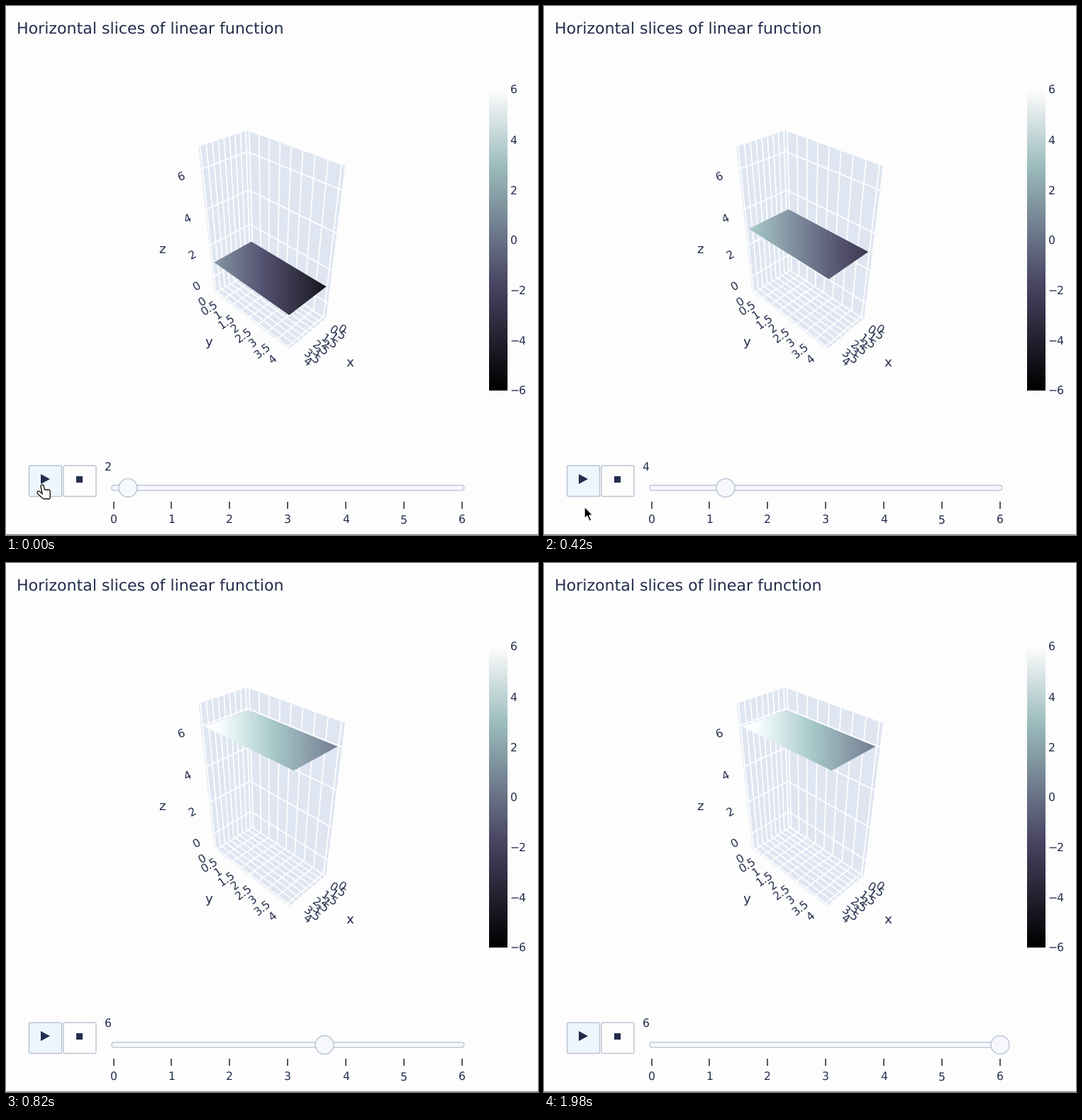
A matplotlib script for the animation above (2 s loop, 750x747 px).

```python
import numpy as np
import matplotlib.pyplot as plt
from matplotlib.animation import FuncAnimation
from matplotlib.collections import LineCollection
from matplotlib.colors import LinearSegmentedColormap
from matplotlib.patches import Circle, FancyBboxPatch, Polygon
from matplotlib.path import Path

W, H, DPI = 750, 747, 100
LOOP, TICK = 2000, 20
PX = 72 / DPI
PAGE, INK, WALL = "#fdfdfd", "#232d4c", "#dfe6f1"
BORDER, KNOB = "#b4bfce", "#f6f8fd"
BONE = LinearSegmentedColormap.from_list("bone_like", [
    (0, "#000000"), (0.365, "#4b4866"), (0.746, "#9cbcbd"), (1, "#fdfdfd")])

# The slice covers 0..4 in x and y, the box is slightly wider
SIDE, PAD = 4, 0.12
NEAR, FAR, LOW, TOP = SIDE + PAD, -PAD, -1, 7

plt.rcParams["font.family"] = "DejaVu Sans"
plt.rcParams["text.hinting"] = "none"
fig = plt.figure(figsize=(W / DPI, H / DPI), dpi=DPI, facecolor=PAGE)
ax = fig.add_axes([0, 0, 1, 1])
ax.axis("off")


# ---------- camera: looks along (-1, -1, -1) at a box of ratio 1:2:3 ----------
EYE, FOCAL, CENTRE = 1.25 * 3 ** 0.5, 546, (369.4, 330.2)


def project(*points):
    x, y, z = np.array(points, float).T
    span = NEAR - FAR
    x, y = (x - 2) / span / 3, (y - 2) / span * 2 / 3
    z = (z - 3) / (TOP - LOW)
    zoom = FOCAL / (EYE - (x + y + z) / 3 ** 0.5)
    return np.column_stack([CENTRE[0] + zoom * (y - x) / 2 ** 0.5,
                            CENTRE[1] + zoom * (x + y - 2 * z) / 6 ** 0.5])


def level(lo, hi, z):
    return [(hi, lo, z), (lo, lo, z), (lo, hi, z), (hi, hi, z)]


# ---------- drawing helpers ----------
def label(x, y, s, size=15.6, angle=0, ha="center", drop=0.365):
    """Text whose digits are centred on (x, y), turned counter-clockwise."""
    a = np.radians(angle)
    return ax.text(x + drop * size * np.sin(a), y + drop * size * np.cos(a), s,
                   fontsize=size * PX, color=INK, rotation=angle, ha=ha,
                   va="baseline", rotation_mode="anchor", zorder=6)


def tick(point, along, s):
    """Axis label at a 3D point, written along a 3D direction."""
    p, q = project(point, np.add(point, along))
    label(*p, s, angle=np.degrees(np.arctan2(p[1] - q[1], q[0] - p[0])))


def box(x0, y0, x1, y1, r, face, edge):
    ax.add_patch(FancyBboxPatch((x0, y0), x1 - x0, y1 - y0, fc=face, ec=edge,
                                boxstyle=f"round,pad=0,rounding_size={r}",
                                lw=1.3 * PX, zorder=4))


def shape(points, face, edge="none", lw=0, z=5):
    return ax.add_patch(Polygon(points, closed=True, fc=face, ec=edge, lw=lw * PX,
                                joinstyle="round", zorder=z))


def strokes(lines, color, width, z):
    return ax.add_collection(LineCollection(lines, colors=color, linewidths=width * PX,
                                            capstyle="round", zorder=z))


# ---------- 3D box ----------
def draw_walls():
    left, back, right, front = level(FAR, NEAR, LOW)
    left_t, back_t, right_t, _ = level(FAR, NEAR, TOP)
    for face in ([left, back, back_t, left_t], [back, right, right_t, back_t],
                 [left, back, right, front]):
        shape(project(*face), WALL, z=1)
    lines = [project((t, FAR, TOP), (t, FAR, LOW), (t, NEAR, LOW)) for t in np.arange(0, 4.1, 0.5)]
    lines += [project((FAR, t, TOP), (FAR, t, LOW), (NEAR, t, LOW)) for t in np.arange(0, 4.1, 0.5)]
    lines += [project(*level(FAR, NEAR, z)[:3]) for z in range(0, 7, 2)]
    ax.add_collection(LineCollection(lines, colors="white", linewidths=1.7 * PX, zorder=2))


def draw_axis_labels():
    for t in np.arange(0, 4.1, 0.5):
        tick((5.55, t, LOW), (-0.5, 0, 0), f"{t:g}")
        tick((t, 4.9, LOW), (0, 0.5, 0), f"{t:g}")
    for z in range(0, 7, 2):
        tick((5.7, FAR, z), (-0.5, 0, 0), str(z))
    for s, x, y in (("x", 485, 504), ("y", 286, 475), ("z", 220, 344)):
        label(x, y, s, 18.4, drop=0.27)


# ---------- page furniture ----------
def draw_colorbar():
    ax.imshow(BONE(np.linspace(0, 1, 425))[:, None, :3], extent=(681, 707, 118, 543),
              aspect="auto", zorder=3)
    for v in range(-6, 7, 2):
        label(710.5, 330.8 - v * 35.4, str(v).replace("-", "\u2212"), ha="left")


def draw_controls():
    box(32.5, 649, 78.5, 692.5, 2, "#eef6fd", BORDER)
    box(81, 649, 127, 692.5, 2, PAGE, BORDER)
    shape([(49, 661), (49, 675), (62, 668)], INK)
    shape([(99, 664), (108, 664), (108, 673), (99, 673)], INK)
    box(149, 676.8, 645.8, 684, 3.4, KNOB, "#b9c2d0")
    for i in range(7):
        x = 151.5 + 81.9 * i
        ax.plot([x, x], [700, 709.5], color="#2b303c", lw=1.6 * PX, solid_capstyle="butt")
        label(x, 724.8, str(i))
    ax.plot([0, W], [745.8, 745.8], color="#8c8c8c", lw=1.3 * PX)


draw_walls()
draw_axis_labels()
draw_colorbar()
draw_controls()
label(14.8, 31.8, "Horizontal slices of linear function", 22.2, ha="left")

surface = ax.imshow(np.zeros((1, 256, 3)), aspect="auto", interpolation="bilinear", zorder=3)
knob = ax.add_patch(Circle((172, 680.5), 13, fc=KNOB, ec=BORDER, lw=1.3 * PX, zorder=5))
counter = label(143.5, 650.3, "2")

# Hand: one long finger, three short ones and a thumb, as outlined strokes
FINGERS = [[(0.2 + 2.9 * i, 9 if i else 2.2), (3.4 + 1.9 * i, 18)] for i in range(4)]
HAND = np.array(FINGERS + [[(-4.8, 11.2), (2, 17.5)]])
ARROW = np.array([(0, 0), (0, 17), (4, 13.2), (7, 20.5), (10, 19.2), (7, 12.3), (12, 12)])
hand = [strokes(HAND, "black", 5.6, 8), strokes(HAND, "white", 3.1, 9)]
arrow = shape(ARROW, "black", "white", 1.4, 8)
ax.set_xlim(0, W)
ax.set_ylim(H, 0)

# ---------- motion ----------
KNOB_STEPS, KNOB_X = (0, 3, 9, 13, 17, 22), (172, 194, 256, 343, 449, 634)


def step_at(ms):
    """Three steps per 140 ms: two short ones, then a long hold."""
    turn, rest = divmod(ms, 140)
    return 3 * turn + min(rest // 20, 2)


def set_surface(z):
    quad = project(*level(0, SIDE, z))
    # z - 2 + x/2 - y varies only from left to right on screen
    value = np.linspace(z, z - 6, 256)
    surface.set_data(np.clip(BONE((value + 6) / 12)[None, :, :3] * 1.04 + 0.025, 0, 1))
    (x0, y0), (x1, y1) = quad.min(0), quad.max(0)
    surface.set_extent((x0, x1, y1 + 1, y0 - 1))
    surface.set_clip_path(Path(np.vstack([quad, quad[:1]])), ax.transData)


def set_pointer(n):
    away = max(n - 5, 0) / 4
    tip = np.array([51 + 6 * away, 676 + 31 * away ** 2])
    on_button = tip[1] < 692
    for part in hand:
        part.set_segments(HAND + tip)
        part.set_visible(on_button)
    arrow.set_xy(ARROW + tip)
    arrow.set_visible(not on_button)


def update(i):
    n = step_at(i * TICK)
    set_surface(min(6, 1 + int((n + 1.6) / 3.7)))
    counter.set_text(str(min(6, 2 + n // 4)))
    knob.center = (643 if n > 22 else np.interp(n, KNOB_STEPS, KNOB_X), 680.5)
    set_pointer(n)
    return surface, counter, knob, arrow, *hand


anim = FuncAnimation(fig, update, frames=LOOP // TICK, interval=TICK,
                     repeat=True, repeat_delay=0)
plt.show()
```
